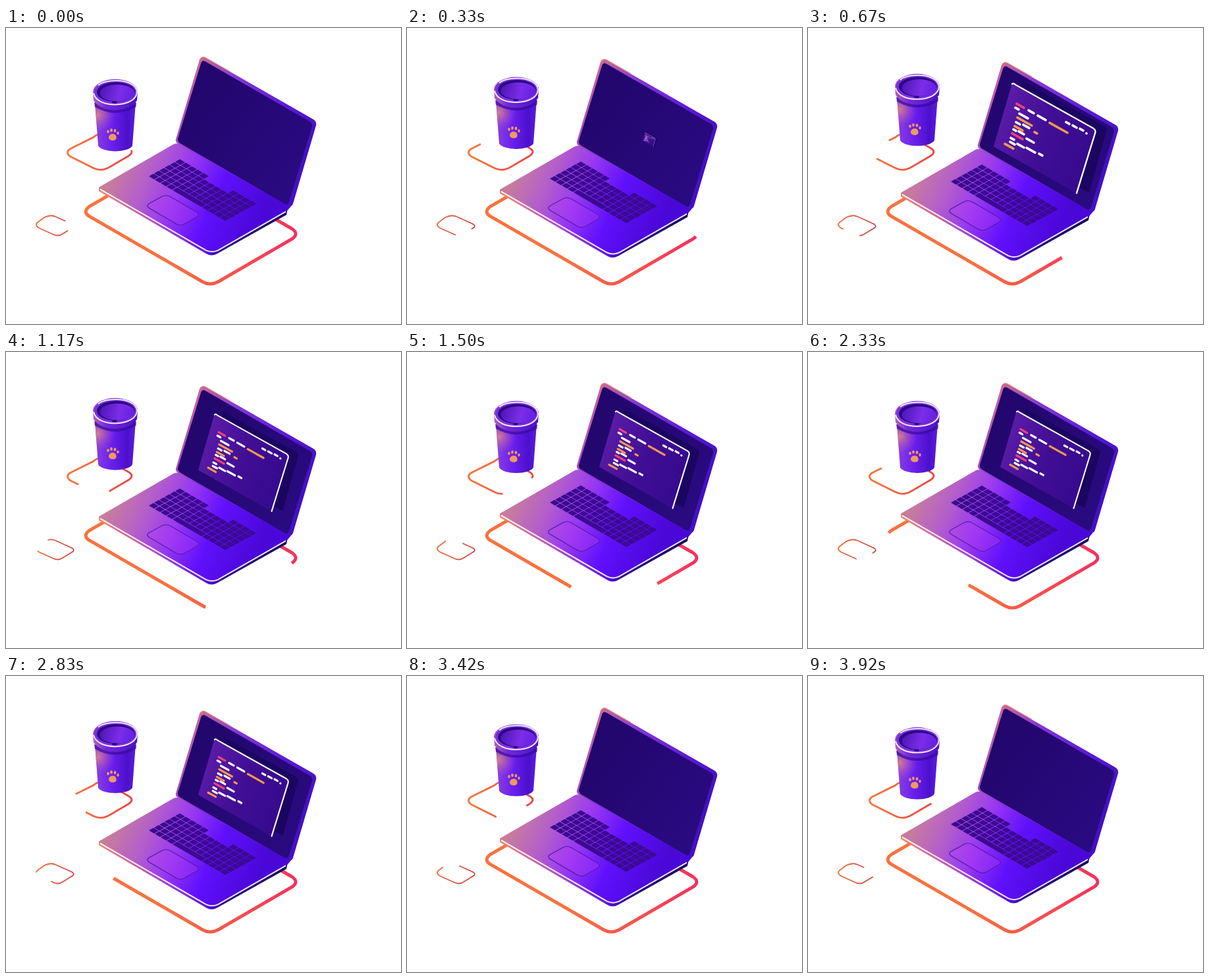
These frames come from a looping animation (600x450 px, 4010 ms). An HTML page:

```html
<!DOCTYPE html>
<html lang="en">
<head>
<meta charset="utf-8">
<title>Laptop and cup</title>
<style>
  html, body { margin: 0; width: 100%; height: 100%; overflow: hidden; background: #fff; }
  svg { display: block; width: 600px; height: 450px; }
</style>
</head>
<body>
<svg viewBox="0 0 600 450">
  <defs>
    <linearGradient id="trail" gradientUnits="userSpaceOnUse" x1="250" y1="0" x2="442" y2="0">
      <stop offset="0" stop-color="#f8723f"/><stop offset="1" stop-color="#f4305f"/>
    </linearGradient>
    <linearGradient id="trailMid" gradientUnits="userSpaceOnUse" x1="94" y1="0" x2="192" y2="0">
      <stop offset="0" stop-color="#f4783f"/><stop offset="1" stop-color="#e8474a"/>
    </linearGradient>
    <linearGradient id="trailSmall" gradientUnits="userSpaceOnUse" x1="46" y1="0" x2="103" y2="0">
      <stop offset="0" stop-color="#e8703f"/><stop offset="1" stop-color="#c8474a"/>
    </linearGradient>
    <linearGradient id="deck" gradientUnits="userSpaceOnUse" x1="165" y1="215" x2="375" y2="310">
      <stop offset="0" stop-color="#c87c9c"/><stop offset=".22" stop-color="#b45fc9"/>
      <stop offset=".43" stop-color="#9a3af0"/><stop offset=".68" stop-color="#6010fc"/>
      <stop offset="1" stop-color="#4a08d8"/>
    </linearGradient>
    <linearGradient id="base" gradientUnits="userSpaceOnUse" x1="141" y1="0" x2="428" y2="0">
      <stop offset="0" stop-color="#f08a6a"/><stop offset=".3" stop-color="#b04fc8"/>
      <stop offset=".57" stop-color="#5a14e0"/><stop offset=".66" stop-color="#2a0888"/>
      <stop offset="1" stop-color="#16045c"/>
    </linearGradient>
    <linearGradient id="lid" gradientUnits="userSpaceOnUse" x1="275" y1="80" x2="460" y2="190">
      <stop offset="0" stop-color="#c9699a"/><stop offset=".3" stop-color="#8436d8"/>
      <stop offset=".7" stop-color="#5a1ad8"/><stop offset="1" stop-color="#4410c4"/>
    </linearGradient>
    <linearGradient id="screen" gradientUnits="userSpaceOnUse" x1="280" y1="90" x2="450" y2="220">
      <stop offset="0" stop-color="#22066c"/><stop offset="1" stop-color="#2a0a80"/>
    </linearGradient>
    <linearGradient id="pane" gradientUnits="userSpaceOnUse" x1="285" y1="140" x2="430" y2="200">
      <stop offset="0" stop-color="#5a1ca8"/><stop offset=".5" stop-color="#400e94"/>
      <stop offset="1" stop-color="#350a8e"/>
    </linearGradient>
    <linearGradient id="body" gradientUnits="userSpaceOnUse" x1="136" y1="0" x2="197" y2="0">
      <stop offset="0" stop-color="#8a3fe0"/><stop offset=".4" stop-color="#6a20ee"/>
      <stop offset=".8" stop-color="#4c10cc"/><stop offset="1" stop-color="#5a1ee0"/>
    </linearGradient>
    <radialGradient id="glow" gradientUnits="userSpaceOnUse" cx="139" cy="132" r="27">
      <stop offset="0" stop-color="#e08a80" stop-opacity=".85"/><stop offset="1" stop-color="#b050c0" stop-opacity="0"/>
    </radialGradient>
    <linearGradient id="rim" gradientUnits="userSpaceOnUse" x1="132" y1="0" x2="200" y2="0">
      <stop offset="0" stop-color="#b562b4"/><stop offset=".3" stop-color="#7428dc"/>
      <stop offset="1" stop-color="#4a12c4"/>
    </linearGradient>
    <linearGradient id="well" gradientUnits="userSpaceOnUse" x1="140" y1="90" x2="195" y2="104">
      <stop offset="0" stop-color="#4a12b0"/><stop offset=".6" stop-color="#7a2ee8"/>
      <stop offset="1" stop-color="#6420e0"/>
    </linearGradient>
  </defs>

  <g id="trails" fill="none">
    <path stroke="url(#trail)" stroke-width="5" d="M434 321L322 386Q310 392 299 386L126 286Q116 279 127 271L240 206Q251 199 262 206L434 305Q446 313 434 321Z"/>
    <path stroke="url(#trailMid)" stroke-width="2.8" d="M97 195L133 213Q145 219 158 211L187 194Q195 188 187 183L154 164Q142 158 133 166L97 184Q90 189 97 195Z"/>
    <path stroke="url(#trailSmall)" stroke-width="1.8" d="M58 288Q68 283 76 287L98 297Q107 301 99 305L86 313Q79 318 70 313L50 304Q42 299 50 294Z"/>
  </g>

  <g id="cup">
    <path fill="url(#body)" d="M135 113L140 179A26.5 10.5 0 0 0 192 179L197 113Z"/>
    <path fill="url(#glow)" d="M135 113L140 179A26.5 10.5 0 0 0 192 179L197 113Z"/>
    <path fill="#3a0aa0" opacity=".75" d="M134 113Q166 137 198 113L197.500 120Q166 138 135 120Z"/>
    <path fill="url(#rim)" d="M132 97A34 19 0 0 1 200 97L199 110Q190 124 166 124.500Q142 124 133 110Z"/>
    <ellipse cx="166" cy="97.500" rx="32.500" ry="18" fill="#7a30de"/>
    <path fill="none" stroke="#f3e6ff" stroke-width="2" d="M133 99C136 112 152 116.500 166 116.500C184 116.500 199 109 199 97C198 86 184 80 167 80C155 80 146 82 140 87"/>
    <ellipse cx="167" cy="97.500" rx="29" ry="15" fill="#2c0884"/>
    <ellipse cx="169" cy="99" rx="26.500" ry="12.800" fill="url(#well)"/>
    <ellipse cx="165" cy="113" rx="4" ry="1.800" fill="#2c0884"/>
    <g fill="#f09a5c">
      <path d="M156 167C156 162 160 161 162.500 161C166 161 168 164 167.500 168C167 172 157 172.500 156 167Z"/>
      <ellipse cx="155" cy="157.500" rx="1.800" ry="2.500"/>
      <ellipse cx="160" cy="155.500" rx="1.900" ry="2.600"/>
      <ellipse cx="165.500" cy="156.200" rx="1.900" ry="2.600"/>
      <ellipse cx="170" cy="160" rx="1.700" ry="2.400"/>
    </g>
  </g>

  <g id="laptop">
    <path fill="url(#base)" d="M141 242L141 248L304 343Q312 348 321 343L426 284L428 274Z"/>
    <path fill="url(#deck)" d="M143 241L254 177Q259 174 264 177L433 271L427 278L321 338Q313 342 305 338L143 245Q140 243 143 241Z"/>
    <path fill="none" stroke="#fff" stroke-opacity=".9" stroke-width="2" d="M143 245L304 338Q313 342 322 338L425 279"/>
    <g id="keys" fill="#3c0a92" stroke="#3c0a92" stroke-width="1.200" stroke-linejoin="round"></g>
    <path fill="#b23cf4" fill-opacity=".35" stroke="#5c1cb4" stroke-width="1.300" d="M217 267L237 256Q243 253 249 256L290 280Q295 284 290 287L271 298Q265 301 259 298L218 274Q212 270 217 267Z"/>
    <path fill="url(#lid)" d="M294 48Q297 42 303 45L467 139Q472 142 471 148L436 267Q434 273 428 270L261 176Q257 173 258 169Z"/>
    <path fill="none" stroke="#e0825c" stroke-opacity=".7" stroke-width="1.500" d="M294 50Q297 42 303 45L340 66"/>
    <path fill="url(#screen)" d="M296 54Q298 48 303 51L461 142Q466 145 465 150L430 264Q428 270 423 267L264 175Q260 172 261 168Z"/>
    <g id="window">
      <path fill="#1b0560" d="M325 80L450 149Q455 152 453 157L427 250L297 180Z"/>
      <path fill="url(#pane)" d="M309 87Q311 83 315 86L433 152Q438 155 437 160L408 251L282 180Z"/>
      <path fill="none" stroke="#fff" stroke-width="2.300" stroke-linecap="round" d="M310 85Q312 83 315 86L433 152Q438 155 436 160L408 251"/>
      <g id="code" stroke-width="3.600" stroke-linecap="round"></g>
    </g>
  </g>
</svg>
<script>
const LOOP = 4010, STEPS = 48, BOB = LOOP / 2;
const $ = id => document.getElementById(id);

function add(parent, tag, attrs) {
  const node = document.createElementNS("http://www.w3.org/2000/svg", tag);
  for (const name in attrs) node.setAttribute(name, attrs[name]);
  parent.appendChild(node);
}

// Keyboard grid: columns run right-down, rows run left-down.
const keyPoint = (c, r) => `${264 + c * 9 - r * 8},${199 + c * 5.25 + r * 4.4}`;
function addKey(c, r, span = 1) {
  const [left, right, top, bottom] = [c + .12, c + span - .12, r + .13, r + .87];
  const points = [[left, top], [right, top], [right, bottom], [left, bottom]];
  add($("keys"), "polygon", { points: points.map(p => keyPoint(...p)).join(" ") });
}
for (let r = 0; r < 6; r++) {
  for (let c = 0; c < 13; c++) {
    if (r === 0 && c > 4 && c < 9) continue;
    if (r === 5 && c > 3 && c < 9) continue;
    addKey(c, r);
  }
}
addKey(4, 5, 5);

// Code strokes: start x, start y, run.
const code = {
  "#f0407c": [[317, 115, 11], [310, 160, 16]],
  "#f2994f": [[367, 144, 27], [318, 136, 22], [314, 149, 12], [344, 158, 4], [299, 176, 13]],
  "#fff": [[335, 125, 8], [349, 133, 12], [392, 143, 5], [402, 148, 6], [413, 153, 5], [423, 160, .1],
    [315, 121, 5], [321, 130, 13], [316, 143, 6], [327, 147, 9], [312, 154, 4], [320, 157, 8],
    [308, 167, 5], [332, 168, 11], [307, 173, 7], [318, 176, 10], [332, 182, 13], [351, 191, 5]]
};
for (const [stroke, lines] of Object.entries(code)) {
  for (const [x, y, run] of lines) {
    add($("code"), "line", { x1: x, y1: y, x2: x + run, y2: y + run * .56, stroke });
  }
}

// Gap of each trail: size, position at time zero, period.
const gaps = [[.2, -1170 / LOOP, LOOP], [.22, .065 - 1170 / BOB, BOB], [.2, .26, BOB]];
const trails = [...$("trails").children];
trails.forEach((path, i) => {
  path.setAttribute("pathLength", 100);
  path.setAttribute("stroke-dasharray", `${100 - gaps[i][0] * 100} ${gaps[i][0] * 100}`);
});

const progress = (t, from, to) => Math.min(1, Math.max(0, (t - from) / (to - from)));
const smooth = p => p * p * (3 - 2 * p);

function windowScale(t) {
  const grow = smooth(progress(t, 250, 630));
  const settle = smooth(progress(t, 670, 1000));
  const shrink = smooth(progress(t, 2900, 3300));
  return (grow - .115 * settle) * (1 - shrink);
}

function draw(t) {
  const lift = 4.7 - 4.8 * Math.cos(2 * Math.PI * (t - 1917) / BOB);
  $("laptop").setAttribute("transform", `translate(0 ${lift})`);
  $("cup").setAttribute("transform", `translate(0 ${-lift})`);

  const scale = windowScale(t);
  $("window").setAttribute("visibility", scale > .01 ? "visible" : "hidden");
  $("window").setAttribute("transform", `translate(369 167) scale(${scale}) translate(-369 -175)`);

  trails.forEach((path, i) => {
    const [size, start, period] = gaps[i];
    const end = (start + size + t / period + 1) % 1;
    path.setAttribute("stroke-dashoffset", -100 * end);
  });
}

function tick() {
  const step = Math.floor(performance.now() % LOOP / LOOP * STEPS + .15);
  draw(step % STEPS * LOOP / STEPS);
  requestAnimationFrame(tick);
}
tick();
</script>
</body>
</html>
```
